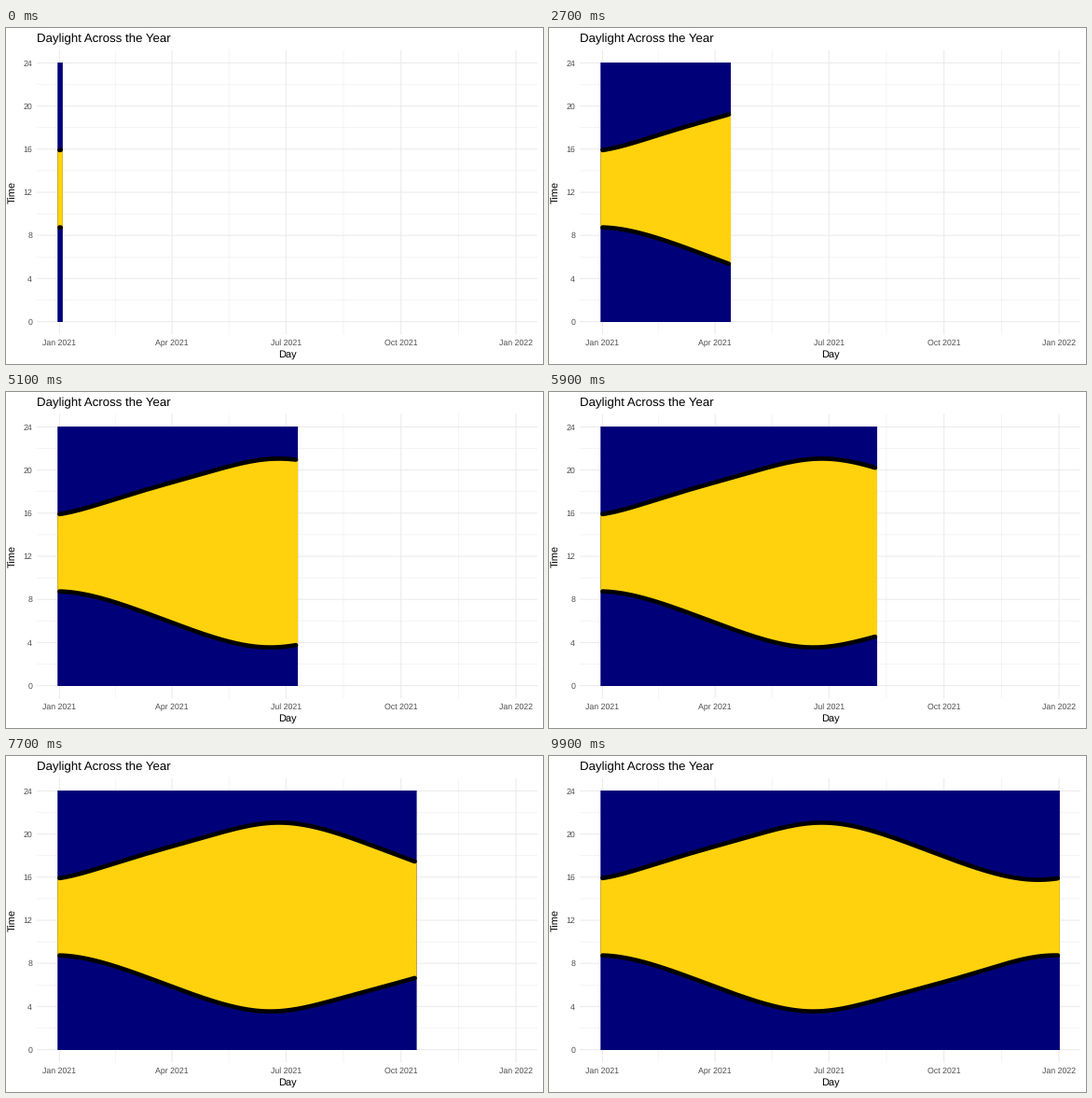
Recreate the animation shown at these times as a matplotlib script. Size 576x360 px, loop 10 s.

```python
import numpy as np
import matplotlib.pyplot as plt
from matplotlib.animation import FuncAnimation
from matplotlib.patches import Polygon, Rectangle

plt.rcParams["font.family"] = "Liberation Sans"
plt.rcParams["text.hinting"] = "none"

W, H, DPI = 576, 360, 72
FRAMES, INTERVAL = 100, 100
LEFT, RIGHT, TOP, BOTTOM = 33.0, 570.2, 23.5, 328.5
NAVY, GOLD, GRID, GREY = "#000078", "#ffd20d", "#ebebeb", "#4d4d4d"
HALF_BAR = 2.13
LAST_DAY = 364


def px(day):
    return 57.4 + day * (RIGHT - LEFT) / 1.1 / LAST_DAY


def py(hour):
    return 314.6 - 11.55 * hour


def sun_times(day, lat=55.5, lon=-4.13):
    """Sunrise and sunset in hours, without daylight saving."""
    g = 2 * np.pi * day / 365
    decl = (0.006918 - 0.399912 * np.cos(g) + 0.070257 * np.sin(g)
            - 0.006758 * np.cos(2 * g) + 0.000907 * np.sin(2 * g)
            - 0.002697 * np.cos(3 * g) + 0.00148 * np.sin(3 * g))
    eot = 229.18 * (0.000075 + 0.001868 * np.cos(g) - 0.032077 * np.sin(g)
                    - 0.014615 * np.cos(2 * g) - 0.040849 * np.sin(2 * g))
    phi = np.radians(lat)
    cos_h = ((np.sin(np.radians(-0.833)) - np.sin(phi) * np.sin(decl))
             / (np.cos(phi) * np.cos(decl)))
    half = np.degrees(np.arccos(cos_h)) / 15
    noon = 12 - lon / 15 - eot / 60
    return noon - half, noon + half


days = np.arange(LAST_DAY + 1)
xs = px(days)
rise, dusk = (py(t) for t in sun_times(days))

fig = plt.figure(figsize=(W / DPI, H / DPI), dpi=DPI, facecolor="white")
ax = fig.add_axes([0, 0, 1, 1])
ax.set_xlim(0, W)
ax.set_ylim(H, 0)
ax.axis("off")


def grid_line(x, y, width):
    ax.plot(x, y, color=GRID, lw=width, snap=False, zorder=1,
            solid_capstyle="butt")


def label(x, y, text, size, color="black", ha="center", **kw):
    ax.text(x, y, text, fontsize=size, color=color, ha=ha,
            va="baseline", **kw)


months = {0: "Jan 2021", 90: "Apr 2021", 181: "Jul 2021",
          273: "Oct 2021", 365: "Jan 2022"}
ticks = np.array(list(months))

for hour in range(2, 24, 4):
    grid_line([LEFT, RIGHT], [py(hour)] * 2, 0.53)
for day in (ticks[:-1] + ticks[1:]) / 2:
    grid_line([px(day)] * 2, [TOP, BOTTOM], 0.53)
for hour in range(0, 25, 4):
    grid_line([LEFT, RIGHT], [py(hour)] * 2, 1.07)
    label(28.05, py(hour) + 3.15, str(hour), 8.8, GREY, "right")
for day, name in months.items():
    grid_line([px(day)] * 2, [TOP, BOTTOM], 1.07)
    label(px(day), 339.8, name, 8.8, GREY)

label(LEFT, 15, "Daylight Across the Year", 13.2, ha="left")
label((LEFT + RIGHT) / 2, 352.5, "Day", 11)
ax.text(13.4, 176, "Time", fontsize=11, rotation=90, ha="right",
        va="center")

x0 = xs[0] - HALF_BAR
night = Rectangle((x0, 37), 1, 278, fc=NAVY, lw=0, snap=False, zorder=2)
light = Polygon([(0, 0), (1, 0), (1, 1)], fc=GOLD, lw=0, snap=False, zorder=3)
ax.add_patch(night)
ax.add_patch(light)
edges = [ax.plot([], [], color="black", lw=4.7, solid_capstyle="round",
                 solid_joinstyle="round", zorder=4)[0] for _ in range(2)]


def update(i):
    # every day whose nearest step has been reached
    n = min(int((i + 0.5) * LAST_DAY / (FRAMES - 1)), LAST_DAY) + 1
    x1 = xs[n - 1] + HALF_BAR
    night.set_width(x1 - x0)
    x = np.r_[x0, xs[:n], x1]
    low, high = (np.r_[c[0], c[:n], c[n - 1]] for c in (rise, dusk))
    light.set_xy(np.c_[np.r_[x, x[::-1]], np.r_[low, high[::-1]]])
    for line, curve in zip(edges, (rise, dusk)):
        line.set_data(xs[:n], curve[:n])
    return [night, light, *edges]


anim = FuncAnimation(fig, update, frames=FRAMES, interval=INTERVAL,
                     init_func=lambda: update(0), repeat=True,
                     repeat_delay=0, blit=False)
plt.show()
```
